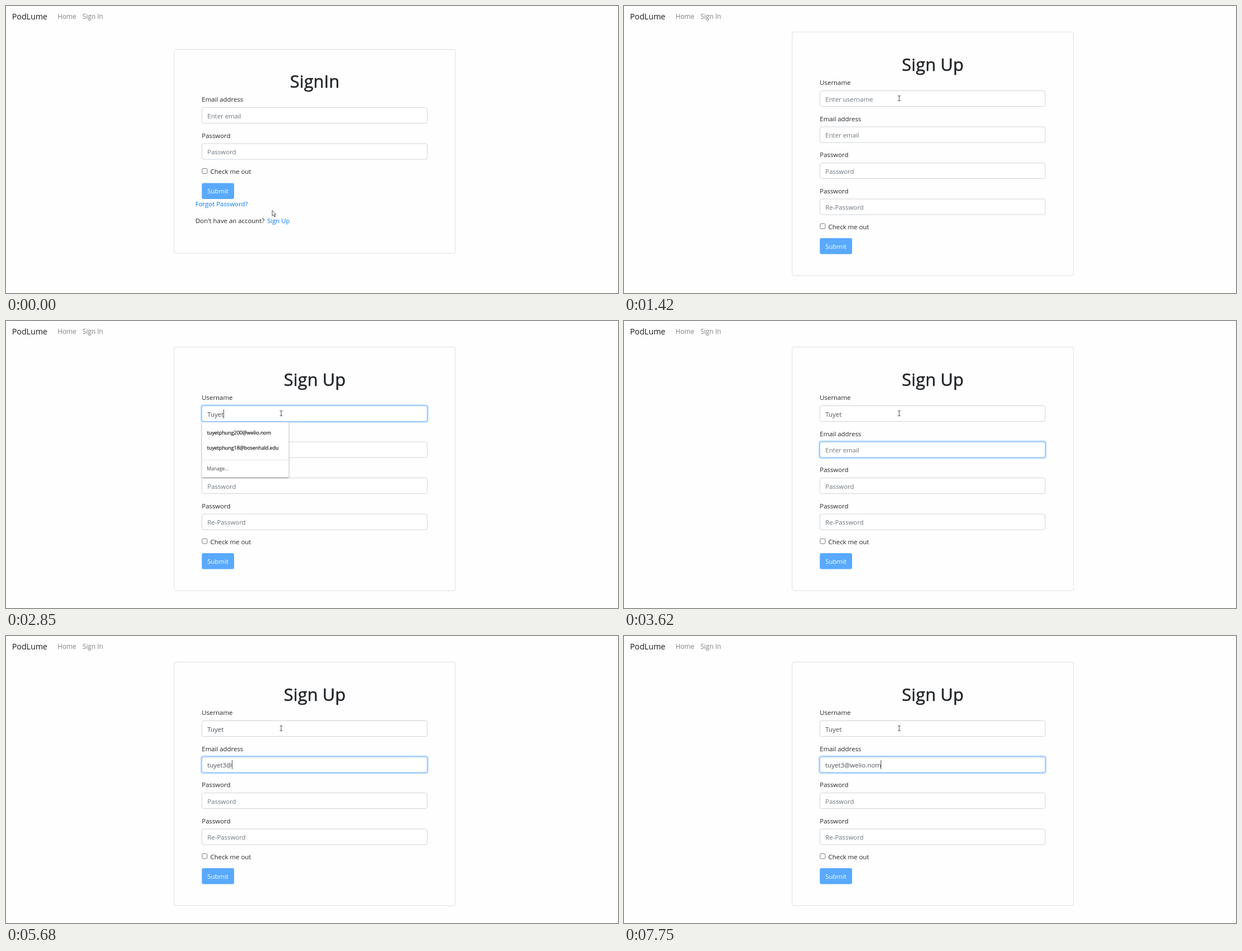
Recreate the animation shown at these times as an HTML page. Size 1092 by 513 pixels, loop 8 s.

```html
<!DOCTYPE html>
<html lang="en">
<head>
<meta charset="utf-8">
<title>Sign up form</title>
<style>
  html, body { margin: 0; width: 100%; height: 100%; overflow: hidden; background: #fefefe; }
  svg { display: block; width: 1092px; height: 513px; font-family: "Open Sans", "Noto Sans", sans-serif; font-size: 11.4px; fill: #212529; }
  text { white-space: pre; }
  .brand { font-size: 14.2px; fill: #1a1a1a; }
  .nav { font-size: 11.8px; fill: #808080; }
  .title { font-size: 30.6px; letter-spacing: .2px; text-anchor: middle; stroke: #212529; stroke-width: .55px; }
  .hint { fill: #6c757d; }
  .typed { fill: #495057; }
  .link { fill: #007bff; }
  .card { fill: #fefefe; stroke: #dfdfdf; }
  .input { fill: #fff; stroke: #ced4da; }
  .check { fill: #fff; stroke: #767676; }
  .button { fill: #59a9ff; }
  .label { fill: #fff; text-anchor: middle; }
  .ring { fill: none; stroke: #bfdeff; stroke-width: 2.5px; }
  .edge { fill: none; stroke: #80bdff; }
  .menu { fill: #fff; stroke: #dcdcdc; stroke-width: .6px; filter: drop-shadow(0 1px 1px rgba(0, 0, 0, .38)); }
  .entry { font-size: 8.9px; fill: #151515; stroke: #151515; stroke-width: .2px; }
  .manage { font-size: 8.5px; fill: #3c4043; }
  .rule { fill: #e4e4e4; }
</style>
</head>
<body>
<svg id="stage" viewBox="0 0 1092 513"></svg>
<script>
const LOOP = 8000;
const stage = document.getElementById("stage");

function add(parent, tag, attrs, content) {
  const node = document.createElementNS("http://www.w3.org/2000/svg", tag);
  for (const key in attrs) node.setAttribute(key, attrs[key]);
  if (content) node.textContent = content;
  parent.appendChild(node);
  return node;
}
const group = parent => add(parent, "g", {});
const text = (parent, x, y, content, cls = "") => add(parent, "text", { x, y, class: cls }, content);
const rect = (parent, cls, x, y, width, height, rx = 0) =>
  add(parent, "rect", { class: cls, x, y, width, height, rx });
const show = (node, on) => node.setAttribute("visibility", on ? "visible" : "hidden");

function field(parent, y, name, hint) {
  text(parent, 349.3, y - 10, name);
  rect(parent, "input", 349.5, y + .5, 402, 28, 3);
  const glow = group(parent);
  rect(glow, "ring", 348.2, y - .8, 404.6, 30.6, 4);
  rect(glow, "edge", 349.5, y + .5, 402, 28, 3);
  return { glow, value: text(parent, 359.3, y + 19.5, hint, "hint"), hint };
}

function checkAndSubmit(parent, y) {
  rect(parent, "check", 350, y + .5, 9, 9, 1.8);
  text(parent, 364.6, y + 10, "Check me out");
  rect(parent, "button", 349.4, y + 26.4, 57.6, 28.6, 3);
  text(parent, 378.2, y + 45.3, "Submit", "label");
}

function menu(top, width, entries, manage) {
  const box = group(stage);
  const end = top + 13 + entries.length * 27.1;
  rect(box, "menu", 349.5, top, width, (manage ? end + 31 : end) - top, 2);
  entries.forEach((entry, i) => text(box, 358.8, top + 22.2 + i * 27.1, entry, "entry"));
  if (manage) {
    rect(box, "rule", 350, end, width - 1, 1);
    text(box, 358.6, end + 18.5, "Manage...", "manage");
  }
  return box;
}

// Navigation
text(stage, 10.8, 24, "PodLume", "brand");
text(stage, 92, 23, "Home", "nav");
text(stage, 136.6, 23, "Sign In", "nav");

// Sign in page
const signIn = group(stage);
rect(signIn, "card", 300, 77.5, 502, 364.5, 3);
text(signIn, 551, 146, "SignIn", "title");
[field(signIn, 181, "Email address", "Enter email"),
 field(signIn, 245.5, "Password", "Password")].forEach(f => show(f.glow, false));
checkAndSubmit(signIn, 290);
text(signIn, 337.8, 358, "Forgot Password?", "link");
text(signIn, 338, 388, "Don't have an account?");
text(signIn, 466, 388, "Sign Up", "link");

// Sign up page
const signUp = group(stage);
rect(signUp, "card", 300, 46.5, 502, 435.5, 3);
text(signUp, 551, 115.7, "Sign Up", "title");
const user = field(signUp, 151, "Username", "Enter username");
const mail = field(signUp, 215.5, "Email address", "Enter email");
show(field(signUp, 280, "Password", "Password").glow, false);
show(field(signUp, 344.5, "Password", "Re-Password").glow, false);
checkAndSubmit(signUp, 388.5);

const caret = rect(stage, "typed", 359, 157, 1, 16);
const names = ["tuyetphung200@welio.nom", "tuyetphung18@bosenhald.edu", "hoaduy18@bosenhald.edu"];
const menus = {
  all: menu(181, 155, names, true),
  some: menu(181, 155, names.slice(0, 2), true),
  mail: menu(245, 163.5, [names[0], "tuyet2@welio.nom", names[1], "tuyet@welio.nom",
    "tuyetphugn200@welio.nom", "TUYETPHUNG200@WELIO.NOM"], false)
};

const arrow = add(stage, "path", {
  d: "M0 0V9.8L2.2 7.8L3.8 11.4L5.4 10.7L3.9 7.2H6.8Z", fill: "#fff", stroke: "#222", "stroke-width": .8
});
const beam = add(stage, "path", {
  d: "M-2.3-4.5H-.8L0-4L.8-4.5H2.3M0-4V4M-2.3 4.5H-.8L0 4L.8 4.5H2.3", fill: "none", stroke: "#333", "stroke-width": .9
});

const start = {
  page: "in", x: 475, y: 365.5, user: "", mail: "", userGlow: 0, mailGlow: 0, caret: "", menu: ""
};
const steps = [
  [150, { x: 484, y: 380 }],
  [300, { page: "up", x: 490, y: 385 }],
  [450, { x: 495.5, y: 387.5 }]
];

// The pointer travels up to the first field, sampled at an even pace
const ease = p => p * p * (3 - 2 * p);
for (let i = 1; i <= 6; i++) {
  const p = ease(i / 6);
  steps.push([730 + (i - 1) * 137, { x: 495.5 - 4.5 * p, y: 387.5 - 222.5 * p }]);
}

// Adds one step per typed length, evenly spread from one time to the other
function type(key, word, lengths, from, to, extra) {
  lengths.forEach((n, i) => {
    const at = from + (to - from) * i / (lengths.length - 1);
    steps.push([at, { [key]: word.slice(0, n), caret: key, ...extra }]);
  });
}
const address = "tuyet3@welio.nom";

steps.push([1550, { userGlow: .6, caret: "user" }], [1690, { userGlow: 1, menu: "all" }], [2060, { caret: "" }]);
type("user", "Tuyet", [1, 2, 3, 4, 5], 2340, 2850, { menu: "some" });
steps.push(
  [3130, { userGlow: .4, mailGlow: .6, caret: "mail", menu: "" }],
  [3250, { userGlow: 0, mailGlow: 1 }],
  [3620, { caret: "" }]
);
type("mail", address, [1, 2, 4, 5], 3900, 4320, { menu: "mail" });
steps.push(
  [4720, { mail: address.slice(0, 6), menu: "" }],
  [5280, { caret: "" }],
  [5680, { mail: address.slice(0, 7), caret: "mail" }],
  [6270, { caret: "" }]
);
type("mail", address, [8, 9, 10, 11, 12], 6410, 6960);
type("mail", address, [13, 14, 15, 16], 7360, 7750);

function fill(box, value, glow) {
  box.value.textContent = value || box.hint;
  box.value.setAttribute("class", value ? "typed" : "hint");
  box.glow.setAttribute("opacity", glow);
}

function draw(time) {
  const s = { ...start };
  for (const [at, change] of steps) if (at <= time) Object.assign(s, change);

  signIn.style.display = s.page === "in" ? "" : "none";
  signUp.style.display = s.page === "up" ? "" : "none";
  fill(user, s.user, s.userGlow);
  fill(mail, s.mail, s.mailGlow);
  for (const key in menus) show(menus[key], s.menu === key);

  show(caret, s.caret);
  if (s.caret) {
    const box = s.caret === "user" ? user : mail;
    const width = s[s.caret] ? box.value.getComputedTextLength() : 0;
    caret.setAttribute("x", Math.floor(359.3 + width));
    caret.setAttribute("y", s.caret === "user" ? 158 : 222);
  }

  const row = (s.y - 151) % 64.5;
  const overField = s.page === "up" && s.y < 374 && row >= 0 && row < 29;
  show(arrow, !overField);
  show(beam, overField);
  (overField ? beam : arrow).setAttribute("transform", `translate(${s.x} ${s.y})`);
}

const begin = performance.now();
function tick() {
  draw((performance.now() - begin) % LOOP);
  requestAnimationFrame(tick);
}
tick();
</script>
</body>
</html>
```
